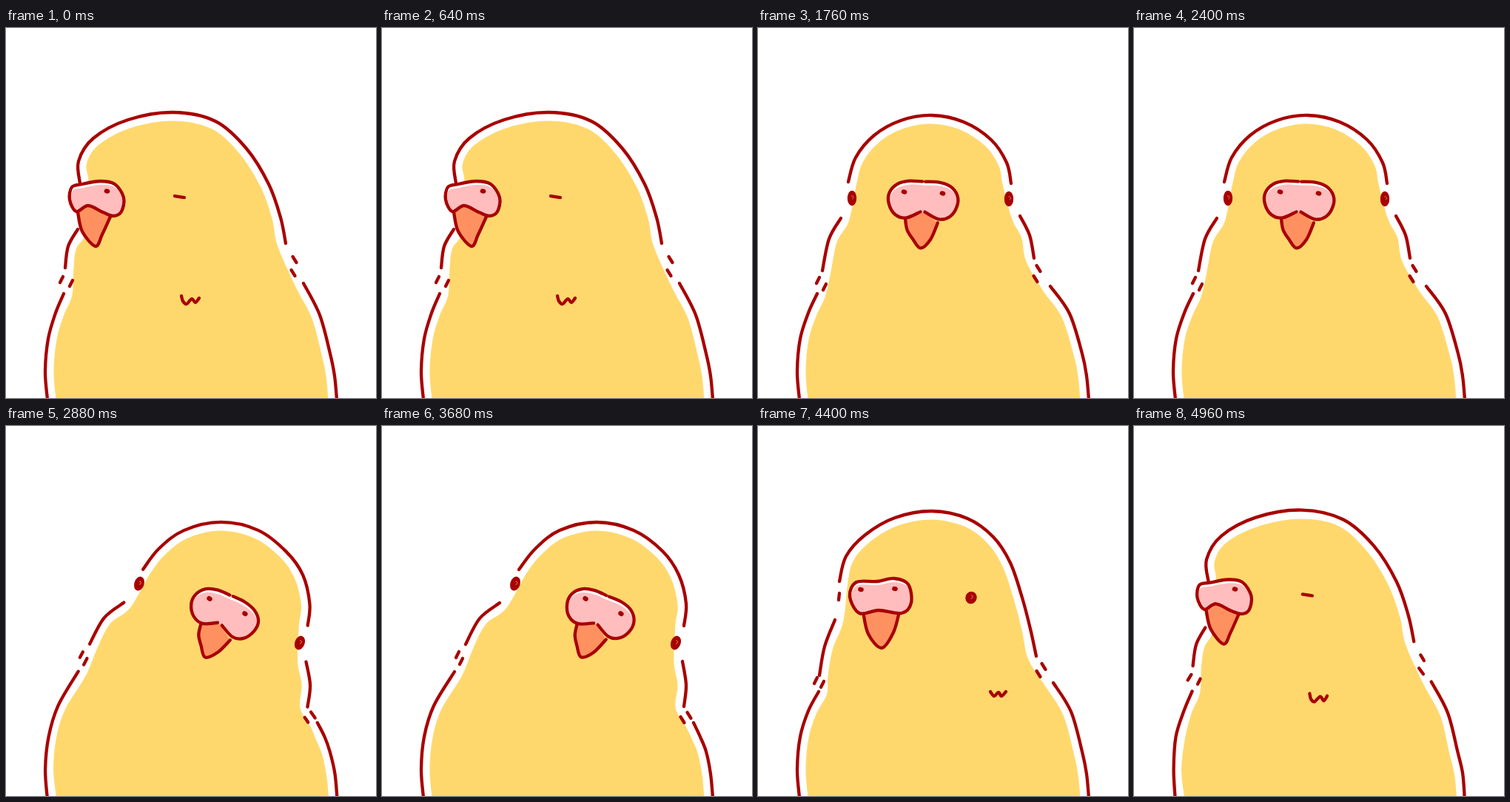
Recreate the animation shown at these times as an HTML page with a canvas. Size 500 by 500 pixels, loop 5040 ms.

```html
<!DOCTYPE html>
<html lang="en">
<head>
<meta charset="utf-8">
<title>Budgie</title>
<style>
html, body { margin: 0; width: 100%; height: 100%; overflow: hidden; background: #fff; }
canvas { display: block; width: 500px; height: 500px; }
</style>
</head>
<body>
<canvas id="stage" width="500" height="500"></canvas>
<script>
const ctx = document.getElementById('stage').getContext('2d');
const INK = '#a80000', BODY = '#ffd86d', PINK = '#ffbdbe', BEAK = '#ff9160';
const STEP = 80, LOOP = 5040, INSET = 11.5;

const pts = s => s.split(' ').map(p => p.split(',').map(Number));
const mirror = list => list.map(([x, y]) => [-x, y]);

// All poses share the lower ends of the flanks
const tailL = pts('57,420 53,464 56,502');
const tailR = pts('438,440 444,470 447,502');

// The face seen from the front, around the point between the nostrils
const lobe = pts('-2,-15 -20,-15 -36,-10 -46,2 -46,17 -37,31 -22,35 -3,26');
const frontFace = {
  nose: [[...lobe].reverse(), mirror(lobe)],
  dots: pts('-26,0 26,0'),
  beak: pts('-23,37 -20,51 -12,63 -1,75 12,63 21,40'),
  root: [0, 26]
};

// rest: phase of the four-step wobble in which the pose stands undisturbed
// at: x, y and angle of the face; eyes: x, y, radii and angle
const side = {
  rest: 0,
  head: pts('100,210 98,180 118,149 165,124 226,114 283,126 325,163 355,211 371,256 378,291'),
  neckL: pts('97,272 84,295 80,324'),
  neckR: [],
  left: pts('78,359 67,385'),
  right: pts('402,345 424,388'),
  ticks: pts('75,340 88,345 390,313 388,331'),
  marks: [pts('228,227 241,229'), pts('237,362 239,369 244,373 251,366 256,371 261,365')],
  eyes: [],
  at: [0, 0, 0],
  face: {
    nose: [pts('86,232 89,215 103,211 127,207 147,211 159,229 156,248 145,254 131,249 111,240 95,248')],
    dots: pts('136.5,220.5'),
    beak: pts('97,249 103,275 121,295 130,279 141,255'),
    root: [111, 240]
  }
};

const turn = {
  rest: 3,
  head: pts('110,210 119,176 145,147 185,124 235,115 283,125 318,150 341,185 357,232 368,274 376,311'),
  neckL: pts('104,262 90,298 83,337'),
  neckR: [],
  left: pts('82,359 68,385'),
  right: pts('399,347 423,386'),
  ticks: pts('78,344 87,349 386,325 379,335'),
  marks: [pts('110,226 109,235'), pts('314,359 319,365 325,360 329,365 335,359')],
  eyes: [[288, 232, 5.5, 6.2, .3]],
  at: [0, 0, 0],
  face: {
    nose: [pts('124,230 133,211 161,210 184,206 203,214 207,239 194,253 163,249 137,253')],
    dots: pts('139,221 185,220'),
    beak: pts('142,251 149,281 167,300 183,279 191,251'),
    root: [166, 250]
  }
};

const front = {
  rest: 2,
  head: pts('122,208 132,175 157,145 193,125 235,118 278,127 315,151 336,182 342,210'),
  neckL: pts('112,257 96,285 87,328'),
  neckR: pts('354,254 367,280 373,311'),
  left: pts('80,359 68,385'),
  right: pts('395,349 421,386'),
  ticks: pts('81,341 90,350 379,325 375,339'),
  marks: [],
  eyes: [[127, 230, 4, 8, 0], [339, 231, 4, 8, 0]],
  at: [223.5, 222.5, .04],
  face: frontFace
};

const tilt = {
  ...front,
  head: pts('185,194 207,166 240,141 290,130 340,141 379,169 401,201 411,240 408,270'),
  neckL: pts('159,239 132,260 113,295'),
  neckR: pts('406,318 411,350 408,379'),
  left: pts('98,332 70,378'),
  right: pts('421,401 430,420'),
  ticks: pts('102,309 107,318 415,391 406,397'),
  eyes: [[180, 213, 4.5, 7.5, .3], [397, 293, 4.5, 7.5, .35]],
  at: [299, 243.5, .4]
};

function mix(a, b, k) {
  if (typeof a === 'number') return a + (b - a) * k;
  if (Array.isArray(a)) return a.map((v, i) => mix(v, b[i], k));
  return Object.fromEntries(Object.keys(a).map(key => [key, mix(a[key], b[key], k)]));
}

const lean = k => mix(front, tilt, k);
const timeline = [
  [0, side], [1120, turn], [1680, front],
  [2480, lean(.25)], [2560, lean(.7)], [2640, tilt],
  [3920, lean(.83)], [4000, lean(.5)], [4080, front],
  [4240, turn], [4560, side]
];

let phase = 0;
function noise(n) {
  const v = Math.sin(n * 12.9898 + phase * 78.233) * 43758.5453;
  return v - Math.floor(v) - .5;
}

function wobble(list) {
  if (!phase) return list;
  return list.map(([x, y], i) => {
    const seed = i * 7 + list.length * 31 + list[0][0];
    return [x + noise(seed) * 1.4, y + noise(seed + 3) * 1.4];
  });
}

// Smooth curve through all points, added to a path
function curve(list, { path = new Path2D(), join = false, loop = false } = {}) {
  const p = wobble(list), n = p.length;
  const at = i => loop ? p[(i + n) % n] : p[Math.min(Math.max(i, 0), n - 1)];
  path[join ? 'lineTo' : 'moveTo'](...p[0]);
  for (let i = 0; i < (loop ? n : n - 1); i++) {
    const a = at(i - 1), b = at(i), c = at(i + 1), d = at(i + 2);
    path.bezierCurveTo(
      b[0] + (c[0] - a[0]) / 6, b[1] + (c[1] - a[1]) / 6,
      c[0] - (d[0] - b[0]) / 6, c[1] - (d[1] - b[1]) / 6, c[0], c[1]);
  }
  return path;
}

function fill(path, color) {
  ctx.fillStyle = color;
  ctx.fill(path);
}

const ink = (list, loop) => ctx.stroke(curve(list, { loop }));

// Moves each point of the silhouette inwards
function inset(list) {
  return list.map(([x, y], i) => {
    const a = list[Math.max(i - 1, 0)], b = list[Math.min(i + 1, list.length - 1)];
    const dx = b[0] - a[0], dy = b[1] - a[1], k = INSET / Math.hypot(dx, dy);
    return [x - dy * k, y + dx * k];
  });
}

function drawBody({ head, neckL, neckR, left, right, ticks, marks }) {
  const flankL = [...left, ...tailL], flankR = [...right, ...tailR];
  const outline = [...[...neckL, ...flankL].reverse(), ...head, ...neckR, ...flankR];
  fill(curve(inset(outline)), BODY);
  [head, neckL, neckR, flankL, flankR, ...marks].filter(l => l.length).forEach(l => ink(l));
  ticks.forEach(([x, y], i) => {
    const dx = i < 2 ? -2 : 2.5;
    ink([[x - dx, y - 4], [x + dx, y + 4]]);
  });
}

function oval(x, y, rx, ry, turned) {
  const path = new Path2D();
  path.ellipse(x, y, rx, ry, turned, 0, Math.PI * 2);
  fill(path, INK);
  return path;
}

function drawFace({ nose, dots, beak, root }) {
  const tip = curve(beak);
  tip.lineTo(...root);
  fill(tip, BEAK);
  ink(beak);

  const loop = nose.length === 1, shape = new Path2D();
  nose.forEach((s, i) => curve(s, { path: shape, join: i > 0, loop }));
  shape.closePath();
  fill(shape, '#fff');
  ctx.save();
  ctx.clip(shape);
  ctx.translate(1, 5);
  fill(shape, PINK);
  ctx.restore();
  nose.forEach(s => ink(s, loop));
  dots.forEach(([x, y]) => oval(x, y, 3.9, 3.1, .2));
}

function drawEye([x, y, rx, ry, turned]) {
  ctx.stroke(oval(x, y, rx, ry, turned));
  ctx.save();
  ctx.translate(x, y);
  ctx.rotate(turned);
  ctx.strokeStyle = '#d98a62';
  ctx.lineWidth = .9;
  ctx.beginPath();
  ctx.arc(noise(x), -1, 2.2, -1.8, 1.2);
  ctx.stroke();
  ctx.restore();
}

function draw(frame) {
  const now = frame * STEP;
  const pose = timeline.filter(([start]) => start <= now).pop()[1];
  phase = (frame - pose.rest + 4) % 4;

  ctx.fillStyle = '#fff';
  ctx.fillRect(0, 0, 500, 500);
  ctx.strokeStyle = INK;
  ctx.lineWidth = 4.3;
  ctx.lineCap = ctx.lineJoin = 'round';

  drawBody(pose);
  const [x, y, angle] = pose.at;
  ctx.save();
  ctx.translate(x, y);
  ctx.rotate(angle);
  drawFace(pose.face);
  ctx.restore();
  pose.eyes.forEach(drawEye);
}

const begin = performance.now();
let shown = -1;
function tick() {
  const frame = Math.floor((performance.now() - begin) % LOOP / STEP);
  if (frame !== shown) draw(shown = frame);
  requestAnimationFrame(tick);
}
tick();
</script>
</body>
</html>
```
